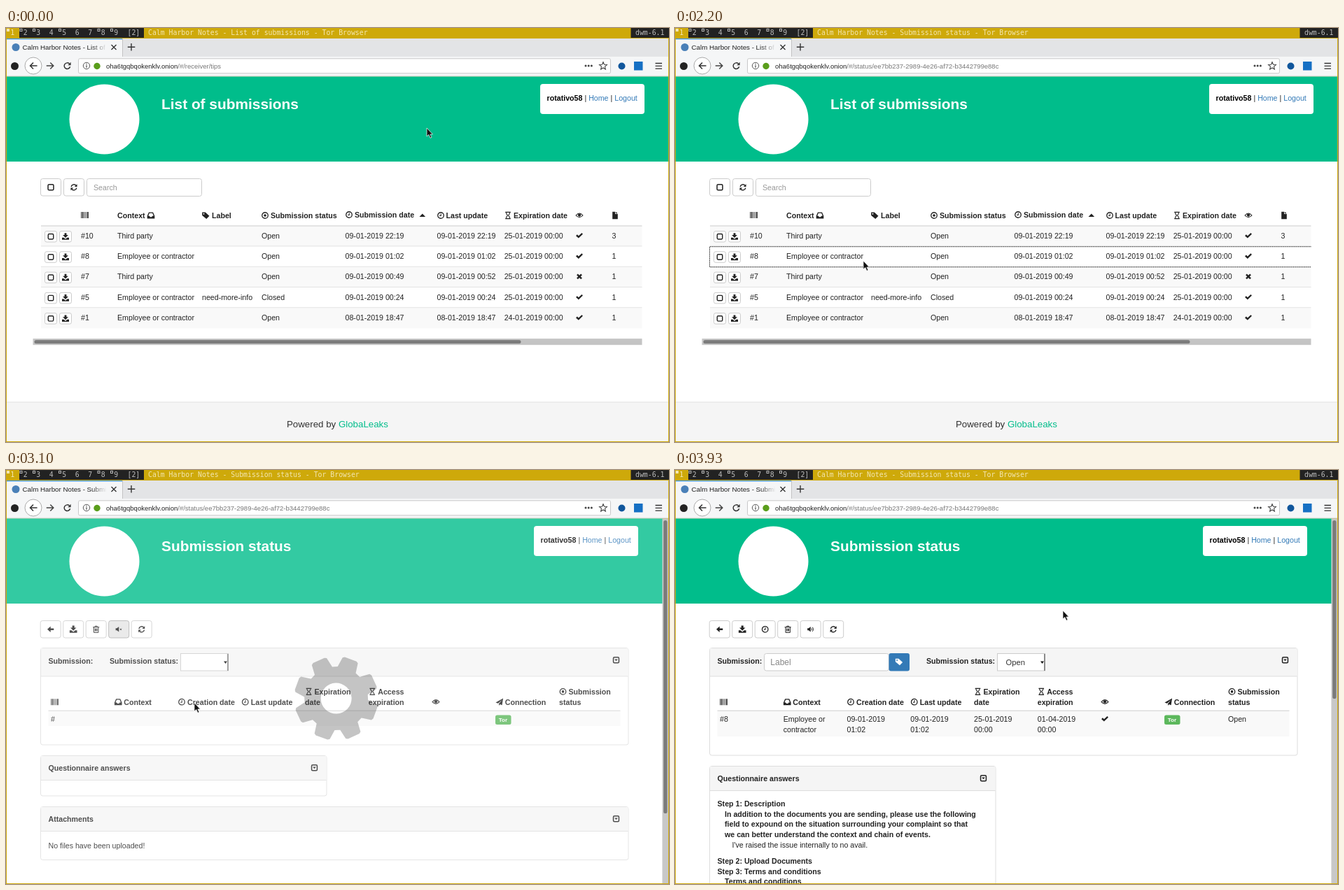
An HTML page that plays this animation: 947x592 px, repeating every 8.01 s.

```html
<!DOCTYPE html>
<html lang="en">
<head>
<meta charset="utf-8">
<title>List of submissions</title>
<style>
  html, body { margin: 0; width: 100%; height: 100%; overflow: hidden; background: #fff; }
  svg { display: block; }
  text { font-family: "Liberation Sans", Arial, sans-serif; white-space: pre; }
  .mono { font-family: "DejaVu Sans Mono", monospace; }
  .line { fill: none; stroke: currentColor; }
</style>
</head>
<body>
<svg id="stage" width="947" height="592" viewBox="0 0 947 592"></svg>
<script>
const LOOP = 8010;
const INK = '#222', LINK = '#337ab7', GREEN = '#00bd8b', GOLD = '#cea90a', BORDER = '#ddd';
const SITE = 'Calm Harbor Notes';
const SIZE = 10.65;

// Icons live in a 14 x 14 box.
const fill = d => `<path d="${d}" fill="currentColor" fill-rule="evenodd"/>`;
const line = (d, w = 1.4) => `<path class="line" d="${d}" stroke-width="${w}"/>`;
const ring = '<circle class="line" cx="7" cy="7" r="5.6" stroke-width="1.7"/>';
const box = '<rect class="line" x="1.8" y="1.8" width="10.4" height="10.4" rx="2" stroke-width="2"/>';
const speaker = fill('M1 5h2.5L7 2v10L3.5 9H1z');
const icons = {
  box,
  boxCaret: box + fill('M4 5.5h6L7 9z'),
  refresh: line('M2 6a5.2 5.2 0 0 1 9-2.6M12 8a5.2 5.2 0 0 1-9 2.6', 1.8) + fill('M13 1v5H8zM1 13V8h5z'),
  download: fill('M5 0h4v4h3.5L7 9.5 1.5 4H5zM0 9h3.5L7 12l3.5-3H14v4.5H0z'),
  tag: fill('M0 1h6l7.5 7-5.5 5.5L0 7zM3 2.8a1.2 1.2 0 1 0 .1 0z'),
  bars: fill('M0 1h1v12H0zM2 1h2v12H2zM5 1h1v12H5zM7.5 1h1v12h-1zM10 1h1v12h-1zM12 1h2v12h-2z'),
  inbox: fill('M3 1h8l3 7v5H0V8zM4.2 2.8L2 8h2.4l1 2h3.2l1-2H12L9.8 2.8z'),
  dot: ring + '<circle cx="7" cy="7" r="2.4" fill="currentColor"/>',
  clock: ring + line('M7.3 3.6v4.1H4.6'),
  hourglass: line('M2 1h10M2 13h10', 1.7) + line('M3.5 1.5c0 3.5 2.6 4 2.6 5.5s-2.6 2-2.6 5.5M10.5 1.5c0 3.5-2.6 4-2.6 5.5s2.6 2 2.6 5.5'),
  eye: line('M.5 7Q7-1 13.5 7 7 14 .5 7z') + '<circle cx="7" cy="6.5" r="2.8" fill="currentColor"/>',
  file: fill('M2 0h5v4.5h5V14H2zM8 0v3.5h4z'),
  check: fill('M.5 7.5L2.8 5l2.7 2.6L11.5 2l2 2.2-8 7.8z'),
  cross: line('M3 3l8 8M11 3l-8 8', 3.2),
  back: fill('M7 1.5L.8 7 7 12.5V8.7h6V5.3H7z'),
  mute: speaker + line('M9 5.5l3 3m0-3l-3 3', 1.2),
  sound: speaker + line('M8.7 5a3 3 0 0 1 0 4M10.3 3a5.5 5.5 0 0 1 0 8', 1.3),
  trash: line('M1 3h12M5 3V1h4v2M2.8 3v10h8.4V3M5.2 5.5v5M7 5.5v5M8.8 5.5v5', 1.3),
  plane: fill('M14 0l-2 13-4-1.7L6 14v-3.5L12 3 4.5 9.8 0 8z'),
  reload: line('M11.8 8.5A5 5 0 1 1 10.5 3.6', 1.7) + fill('M13 1v5H8z'),
  arrow: line('M7 1.8L1.8 7 7 12.2M2 7h11.5', 1.8),
  star: line('M7 .8l1.8 4.1 4.5.4-3.4 3 1 4.5L7 10.4l-3.9 2.4 1-4.5-3.4-3 4.5-.4z', 1.3),
};

function icon(name, cx, cy, color = INK, size = SIZE) {
  return `<g transform="translate(${cx - size / 2} ${cy - size / 2}) scale(${size / 14})" color="${color}">${icons[name]}</g>`;
}
function text(x, y, str, { size = SIZE, color = INK, bold, cls = '', id = '' } = {}) {
  return `<text x="${x}" y="${y}" font-size="${size}" fill="${color}" class="${cls}" id="${id}"${bold ? ' font-weight="700"' : ''}>${str}</text>`;
}
const bold = (x, y, str) => text(x, y, str, { bold: true });
function rect(x, y, w, h, color, stroke = 'none', rx = 0) {
  return `<rect x="${x}" y="${y}" width="${w}" height="${h}" rx="${rx}" fill="${color}" stroke="${stroke}"/>`;
}
const disc = (cx, cy, r, color, stroke = 'none') => `<circle cx="${cx}" cy="${cy}" r="${r}" fill="${color}" stroke="${stroke}"/>`;
function button(name, cx, pressed) {
  return rect(cx - 14.5, 215.5, 29, 24.5, pressed ? '#e4e4e4' : '#fff', pressed ? '#adadad' : '#ccc', 3) + icon(name, cx, 227.8);
}
const tspan = (str, color, weight = 400) => `<tspan fill="${color}" font-weight="${weight}">${str}</tspan>`;

function browser() {
  let s = rect(0, 0, 947, 592, GOLD) + rect(0, 0, 197, 14, INK) + rect(0, 0, 19, 14, GOLD);
  const mono = { size: 9.84, cls: 'mono', color: '#bbb' };
  const bright = '#f3e6b2';
  for (let i = 1; i <= 9; i++) {
    const x = (i - 1) * 18.5;
    const color = i === 1 ? bright : mono.color;
    s += text(x + 6.3, 10.4, i, { ...mono, color });
    if ([1, 2, 3, 5, 8, 9].includes(i)) s += rect(x + 1.5, 1.5, 3, 3, i === 1 ? color : 'none', color);
  }
  s += text(173.5, 10.4, '[2]', mono)
    + text(203, 10.4, '', { ...mono, color: bright, id: 'windowTitle' })
    + rect(892.5, 0, 54.5, 14, INK) + text(899, 10.4, 'dwm-6.1', mono);
  // tab strip
  s += rect(1, 15, 945, 26, '#e3e4e6') + rect(1, 15, 165.5, 26, '#f5f6f7') + rect(1, 15, 165.5, 1.3, '#3a94e8')
    + rect(166, 15, 1, 26, '#c4c4c4')
    + disc(14, 27.5, 5.5, '#4a80b8')
    + `<svg width="143" height="41">${text(23.5, 31, '', { size: 9.75, id: 'tabTitle' })}</svg>`
    + rect(122, 18, 22, 20, 'url(#fade)')
    + '<path d="M150.500 24l7 7m0-7l-7 7M179 22v10.500M173.800 27.200h10.500" stroke="#333" stroke-width="1.400"/>';
  // navigation bar
  s += rect(1, 41, 945, 28, '#f5f6f7') + rect(1, 68.5, 945, 1, '#ccc')
    + disc(12.5, 54.5, 5.5, INK)
    + disc(39, 54, 12, '#fff', '#aaa')
    + icon('arrow', 39, 54, '#333', 12)
    + `<g transform="matrix(-1 0 0 1 126.5 0)">${icon('arrow', 63.2, 54, '#444', 12)}</g>`
    + icon('reload', 87.5, 54, '#333', 12)
    + rect(103.5, 43.8, 760, 21, '#fff', '#c8c8c8', 2)
    + disc(115, 54, 4.7, 'none', '#555') + '<path d="M115 51v1.3M115 53.2v3.6" stroke="#555" stroke-width="1.3"/>'
    + disc(130, 54.5, 4.7, '#5a9e1c')
    + text(143, 57.5, '', { size: 9.5, id: 'address' })
    + [828, 832.2, 836.4].map(x => disc(x, 54, 1.5, '#444')).join('')
    + icon('star', 853, 54, '#444', 12)
    + disc(879.5, 54.5, 5, '#10569c') + rect(897, 48, 12.5, 12.5, '#1670c4')
    + '<path d="M927.5 50.5h9.5M927.5 54.3h9.5M927.5 58.1h9.5" stroke="#333" stroke-width="1.3"/>';
  return s;
}

function banner(title, width, shift) {
  return rect(1, 69.5, width, 521.5, '#fff') + rect(1, 69.5, width, 121.5, GREEN)
    + disc(140.5, 130.5, 50, '#fff')
    + text(222, 115.8, title, { size: 20.87, color: '#fff', bold: true })
    + rect(763 - shift, 80, 149, 43, '#fff', 'none', 4)
    + text(772.6 - shift, 104, `${tspan('rotativo58', '#000', 700)} | ${tspan('Home', LINK)} | ${tspan('Logout', LINK)}`);
}

function listView() {
  let s = banner('List of submissions', 945, 0)
    + button('box', 64) + button('refresh', 97)
    + rect(115.5, 215.5, 164, 25, '#fff', '#ccc', 3) + text(125, 231.8, 'Search', { color: '#999' });
  s += icon('bars', 112.5, 267.5) + bold(159, 272.3, 'Context') + icon('inbox', 207, 268)
    + icon('tag', 285.5, 268) + bold(294, 272.3, 'Label')
    + icon('dot', 370, 268) + bold(378, 272.3, 'Submission status')
    + icon('clock', 490, 267) + bold(498, 271.3, 'Submission date') + `<path d="M590.5 270l4.3-4.5 4.3 4.5z" fill="${INK}"/>`
    + icon('clock', 621, 268) + bold(628.5, 272.3, 'Last update')
    + icon('hourglass', 717, 268) + bold(725, 272.3, 'Expiration date')
    + icon('eye', 819, 268) + icon('file', 870, 268);
  const rows = [
    ['#10', 'Third party', '', 'Open', '09-01-2019 22:19', '09-01-2019 22:19', '25-01-2019 00:00', 3],
    ['#8', 'Employee or contractor', '', 'Open', '09-01-2019 01:02', '09-01-2019 01:02', '25-01-2019 00:00', 1],
    ['#7', 'Third party', '', 'Open', '09-01-2019 00:49', '09-01-2019 00:52', '25-01-2019 00:00', 1],
    ['#5', 'Employee or contractor', 'need-more-info', 'Closed', '09-01-2019 00:24', '09-01-2019 00:24', '25-01-2019 00:00', 1],
    ['#1', 'Employee or contractor', '', 'Open', '08-01-2019 18:47', '08-01-2019 18:47', '24-01-2019 00:00', 1],
  ];
  const columns = [107, 159, 280, 365, 484.5, 615.5, 711.7, 865.5];
  rows.forEach((row, i) => {
    const top = 283 + i * 29.3;
    if (i % 2 === 0) s += rect(50, top, 858.5, 29.3, '#f9f9f9');
    s += rect(50, top - 0.8, 858.5, i ? 0.8 : 1.5, BORDER);
    for (const [name, x] of [['box', 64], ['download', 85]]) {
      s += rect(x - 8.5, top + 7.5, 17, 15.5, '#fff', '#ccc', 2.5) + icon(name, x, top + 15.2, INK, 10);
    }
    row.forEach((cell, c) => { s += text(columns[c], top + 17.8, cell); });
    s += icon(row[0] === '#7' ? 'cross' : 'check', 819, top + 13.8);
  });
  return s + rect(38.5, 444.2, 870, 9, '#c4c4c4') + rect(40.5, 446.2, 695, 5, '#7b7b7b', 'none', 2.5)
    + rect(1, 535, 945, 56, '#f5f5f5') + rect(1, 534.5, 945, 1, '#e2e2e2')
    + text(401, 571.3, `Powered by ${tspan('GlobaLeaks', GREEN)}`, { size: 13.3, color: '#333' });
}

function panel(top, right, bottom, headHeight, title) {
  return rect(49.5, top, right - 49.5, bottom - top, '#fff', BORDER, 3)
    + rect(50, top + 0.5, right - 50.5, headHeight, '#f5f5f5') + rect(50, top + headHeight, right - 50.5, 1, BORDER)
    + bold(60.5, top + 21.7, title) + icon('boxCaret', right - 17.5, top + 17.2);
}

function statusView(buttons, pressed, loaded) {
  let s = banner('Submission status', 937, 9);
  buttons.forEach((name, i) => { s += button(name, 63.7 + i * 32.5, i === pressed); });
  const selectX = loaded ? 460.5 : 249.5;
  s += panel(254.5, 889, loaded ? 408 : 393, 40, '')
    + bold(60.5, 277.2, 'Submission:') + bold(loaded ? 359 : 148, 277.2, 'Submission status:')
    + rect(selectX, 262.5, 68, 24.5, '#fff', '#ccc') + rect(selectX + 66.8, 263, 1.2, 24, '#555')
    + `<path d="M${selectX + 61.5} 273.5h5l-2.5 3.5z" fill="#111"/>`;
  if (loaded) {
    s += text(472.5, 278.6, 'Open', { size: 11.2, color: '#333' })
      + rect(127.5, 262.5, 178, 24.5, '#fff', '#ccc', 3) + text(136.3, 278.6, 'Label', { size: 12, color: '#888' })
      + rect(305.5, 262, 29.5, 25.5, LINK, 'none', 3) + icon('tag', 320.2, 274.3, '#fff');
  }
  const heads = [
    ['bars'], ['inbox', 'Context'], ['clock', 'Creation date'], ['clock', 'Last update'],
    ['hourglass', 'Expiration', 'date'], ['hourglass', 'Access', 'expiration'],
    ['eye'], ['plane', 'Connection'], ['dot', 'Submission', 'status'],
  ];
  const cells = loaded ? [
    ['#8'], ['Employee or', 'contractor'], ['09-01-2019', '01:02'], ['09-01-2019', '01:02'],
    ['25-01-2019', '00:00'], ['01-04-2019', '00:00'], [], [], ['Open'],
  ] : [['#']];
  const column = i => 64 + i * 90.75;
  s += rect(60.5, 345, 817, loaded ? 36 : 21, '#f9f9f9') + rect(60.5, 343.5, 817, 1.5, BORDER);
  heads.forEach(([name, first = '', second], i) => {
    const x = column(i), y = second ? 321.2 : 336;
    s += icon(name, x + 5.5, y - 4.3) + bold(x + 13.5, y, first) + (second ? bold(x, 336, second) : '');
  });
  cells.forEach((lines, i) => lines.forEach((str, n) => { s += text(column(i), 360 + n * 14.8, str); }));
  s += rect(699, 350.5, 22.5, 13.5, '#5cb85c', 'none', 2.5) + text(703.7, 360.3, 'Tor', { size: 8.1, color: '#fff', bold: true });
  if (loaded) {
    s += icon('check', 614, 355.8) + panel(423.5, 458, 620, 34.5, 'Questionnaire answers')
      + bold(60.5, 480.7, 'Step 1: Description')
      + bold(71, 495.5, 'In addition to the documents you are sending, please use the following')
      + bold(71, 510.2, 'field to expound on the situation surrounding your complaint so that')
      + bold(71, 525, 'we can better understand the context and chain of events.')
      + text(81.5, 539.8, "I've raised the issue internally to no avail.")
      + bold(60.5, 562.8, 'Step 2: Upload Documents')
      + bold(60.5, 577.6, 'Step 3: Terms and conditions')
      + bold(71, 592.3, 'Terms and conditions');
  } else {
    s += panel(408.5, 458, 466, 34.5, 'Questionnaire answers')
      + panel(481.5, 889, 557.5, 34.5, 'Attachments')
      + text(60.5, 540.6, 'No files have been uploaded!')
      + rect(1, 69.5, 937, 521.5, 'rgba(255,255,255,.2)');
  }
  return s + rect(937.4, 69.5, 8.6, 521.5, '#c8c8c8') + rect(939.2, 72, 5.3, loaded ? 255 : 419, '#7b7b7b', 'none', 2.6);
}

function gearPath() {
  const points = [];
  const tooth = [[45.5, -17.6], [59, -11.4], [60.3, -8.5], [60.3, 8.5], [59, 11.4], [45.5, 17.6]];
  for (let turn = 0; turn < 360; turn += 45) {
    for (const [r, a] of tooth) {
      const angle = (turn + a) * Math.PI / 180;
      points.push(`${(r * Math.sin(angle)).toFixed(2)} ${(-r * Math.cos(angle)).toFixed(2)}`);
    }
  }
  return `M${points.join('L')}zM22 0A22 22 0 1 0-22 0 22 22 0 1 0 22 0z`;
}

const views = {
  list: listView(),
  loading: statusView(['back', 'download', 'mute', 'refresh'], 2, false),
  loadingMore: statusView(['back', 'download', 'trash', 'mute', 'refresh'], 3, false),
  loaded: statusView(['back', 'download', 'clock', 'trash', 'sound', 'refresh'], -1, true),
};
document.getElementById('stage').innerHTML =
  `<defs><linearGradient id="fade"><stop stop-color="#f5f6f7" stop-opacity="0"/><stop offset="1" stop-color="#f5f6f7"/></linearGradient>
   <clipPath id="page"><path d="M1 69H946V591H1z"/></clipPath></defs>`
  + browser()
  + Object.entries(views).map(([name, s]) => `<g id="${name}" clip-path="url(#page)">${s}</g>`).join('')
  + '<path id="focus" d="M908.5 312.7H49.5V341.8H908.5" fill="none" stroke="#222" stroke-dasharray="1 .6"/>'
  + `<path id="gear" d="${gearPath()}" fill="#000" fill-opacity=".23" fill-rule="evenodd"/>`
  + '<path id="cursor" d="M0 0V12L2.8 9.5 5 14.3 7 13.3 4.9 9H8.5z" fill="#111" stroke="#fff" stroke-width=".7"/>';

const node = id => document.getElementById(id);
const show = (id, on) => node(id).setAttribute('display', on ? 'inline' : 'none');

// Linear track through [time, ...values] keys, held at the start and the end.
function track(keys, t) {
  if (t <= keys[0][0]) return keys[0].slice(1);
  const next = keys.findIndex(key => key[0] > t);
  if (next < 0) return keys[keys.length - 1].slice(1);
  const [from, to] = [keys[next - 1], keys[next]];
  const k = (t - from[0]) / (to[0] - from[0]);
  return from.slice(1).map((v, i) => v + (to[i + 1] - v) * k);
}
const cursorPath = [
  [540, 601, 143], [660, 505, 129], [770, 400, 144], [900, 318, 220], [1030, 278, 306], [1170, 269, 333],
  [3130, 269, 333], [3220, 350, 292], [3330, 505, 216], [3420, 554, 201],
];
const gearSpin = [[2200, -47], [2470, 0], [3100, 110], [3430, 199], [3830, 308]];

function draw(t) {
  const view = t < 2230 ? 'list' : t < 2800 ? 'loading' : t < 3800 ? 'loadingMore' : 'loaded';
  for (const name in views) show(name, name === view);
  show('focus', view === 'list' && t >= 1600);
  show('gear', view.startsWith('loading'));
  const title = late => `${SITE} - ${late ? 'Submission status' : 'List of submissions'}`;
  node('windowTitle').textContent = `${title(t >= 2170)} - Tor Browser`;
  node('tabTitle').textContent = title(view !== 'list');
  const path = t < 1770 ? '/#/receiver/tips' : '/#/status/ee7bb237-2989-4e26-af72-b3442799e88c';
  node('address').innerHTML = `oha6tgqbqokenklv.onion${tspan(path, '#777')}`;
  node('gear').setAttribute('transform', `translate(469 319.8) rotate(${track(gearSpin, t)}) translate(5.4 -4.8)`);
  node('cursor').setAttribute('transform', `translate(${track(cursorPath, t).join(' ')})`);
}

const start = performance.now();
function frame() {
  draw((performance.now() - start) % LOOP);
  requestAnimationFrame(frame);
}
frame();
</script>
</body>
</html>
```
